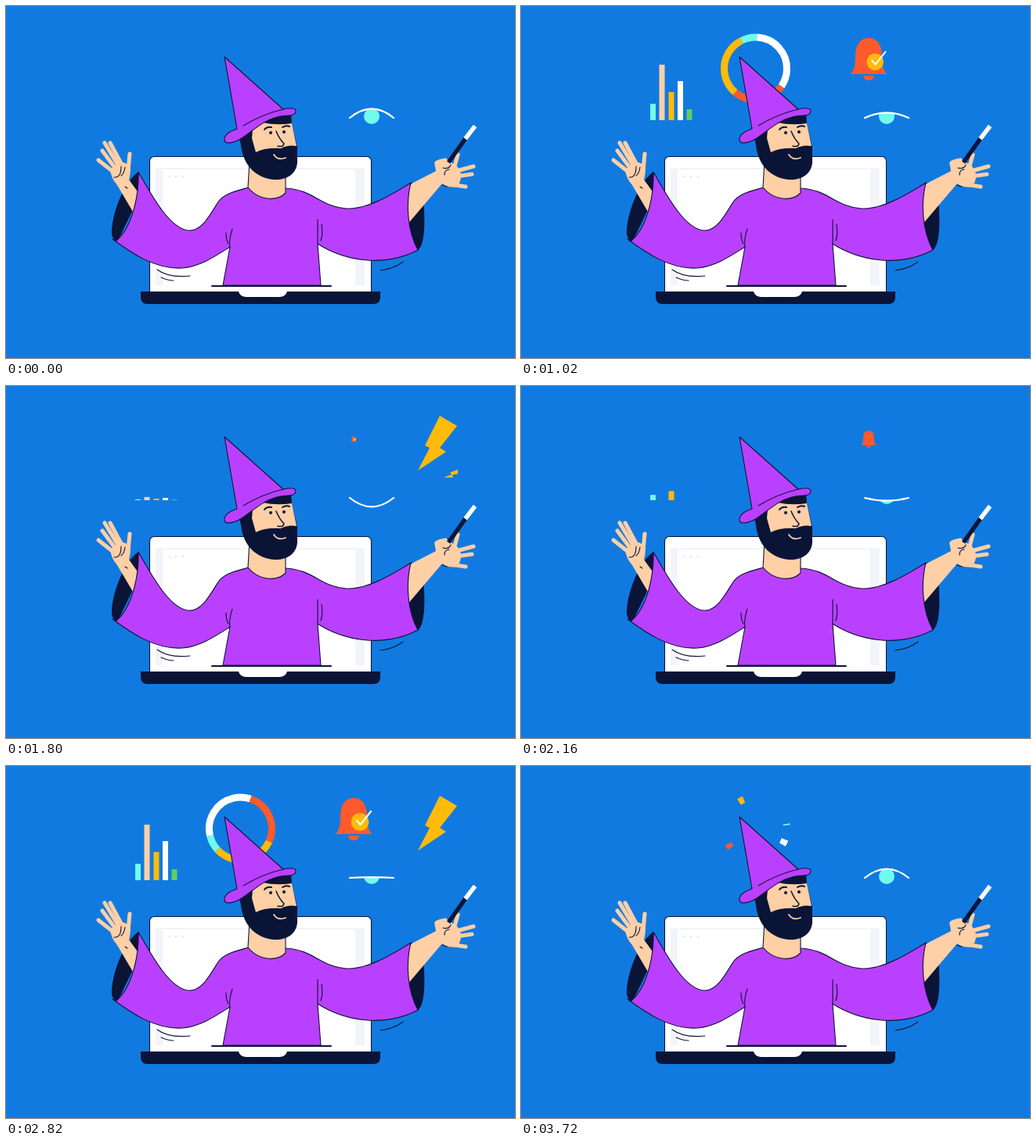
An HTML page that plays this animation: 650x450 px, repeating every 3780 ms.

```html
<!DOCTYPE html>
<html lang="en">
<head>
<meta charset="utf-8">
<title>Wizard</title>
<style>
  html, body { margin: 0; width: 100%; height: 100%; overflow: hidden; background: #117ae0; }
  svg { display: block; }
  .ink { fill: #0a1437; }
  .skin { fill: #ffcfa6; }
  .robe { fill: #ba40ff; }
  .line { fill: none; }
  .line, .edge { stroke: #0a1437; stroke-width: 1.1; stroke-linecap: round; stroke-linejoin: round; }
  .fingers { fill: none; stroke: #ffcfa6; stroke-width: 5; stroke-linecap: round; stroke-linejoin: round; }
  .thick { stroke-width: 2; }
</style>
</head>
<body>
<svg width="650" height="450" viewBox="0 0 650 450">
  <defs><clipPath id="underLid"><path id="lidClip"/></clipPath></defs>
  <g id="ring" fill="none" stroke-width="9"></g>
  <g id="bars"></g>

  <g id="bell">
    <path fill="#ff5a2b" d="M420 87Q427 83 427 65C427 48 434 41 444 41S461 48 461 65Q461 83 468 87ZM437 89H451Q450 95 444 95T437 89Z"/>
    <g id="badge">
      <circle cx="452" cy="71.5" r="11.3" fill="#ffbb08"/>
      <path d="M448 70L452.5 75L466 58" fill="none" stroke="#fff" stroke-width="2.2" stroke-linecap="round"/>
    </g>
  </g>

  <g fill="#ffbb08">
    <path id="bolt" d="M554 38L576 51L554 79L562 84L526 108L541 79L535 76Z"/>
    <path id="spark" d="M582 104L569 109L572 112L559 117H574L573 113L582 111Z"/>
  </g>

  <circle cx="467" cy="141" r="10" fill="#70fbec" clip-path="url(#underLid)"/>
  <path id="lid" fill="none" stroke="#fff" stroke-width="2.2" stroke-linecap="round"/>

  <!-- laptop -->
  <path class="edge" fill="#fff" d="M183.5 367V199Q183.5 192.5 190 192.5H460Q466.5 192.5 466.5 199V367Z"/>
  <path fill="#f2f4f9" d="M191 207H458V357H446V209H200V357H191Z"/>
  <g fill="#e6e9f1"><circle cx="209" cy="218" r="1.5"/><circle cx="217" cy="218" r="1.5"/><circle cx="226" cy="218" r="1.5"/></g>
  <path class="ink" d="M172 365H478V372Q478 381 469 381H181Q172 381 172 372Z"/>
  <path fill="#fff" d="M297 365H359Q357 372 349 372H307Q299 372 297 365Z"/>

  <!-- sleeve openings and arms -->
  <path class="ink" d="M169 212C149 226 134 270 135 291Q136 300 143 300L172 240Z"/>
  <path class="ink" d="M516 226Q532 222 534 262Q536 306 525 313L510 280Z"/>
  <path class="skin" d="M133 209L146 199Q157 201 159 207Q159 215 157 222L170 240L165 268L142 229Q134 220 133 209Z"/>
  <path class="fingers" d="M118 197L137 212M123 185L140 208M126 175L144 205M133 175L149 205M158 189L156 210"/>
  <path class="line" d="M138 219Q147 220 147 205M152 206Q151 214 147 217M152 231L155 233"/>
  <path class="skin" d="M512 230L549 211L547 200Q553 194 562 196L576 205Q586 217 576 231Q566 233 557 227L512 280Z"/>
  <path class="fingers" d="M572 208L577 190M575 211L597 205M574 218L595 215M562 227L587 231"/>
  <path d="M565 200L587 169" stroke="#0a1437" stroke-width="5.5"/>
  <path d="M586.5 169.700L599 153.5" stroke="#fff" stroke-width="5.5"/>
  <path class="fingers" d="M551 200L561 197M555 207L568 207"/>
  <path class="line" d="M558 207Q566 209 568 203M560 216Q560 209 566 209M557 229L563 231"/>

  <!-- robe -->
  <path class="robe edge" d="M310 232C292 237 277 240 270 252C259 270 250 286 235 287C211 287 188 246 169 212C170 245 160 284 141 300L136 298C159 315 190 337 225 335C249 333 270 318 286 308L277 357H402L398 304C429 324 480 336 526 312C513 288 510 254 517 226C488 244 460 260 435 259C399 256 394 235 357 233Z"/>
  <path class="line" d="M289 285C286 294 285 302 286 308M281 290Q281 299 284 304M398 273V304M403 279Q405 292 402 300"/>
  <path class="line" d="M193 337Q208 348 235 345M198 347Q207 351 214 351M478 338Q495 336 507 327"/>
  <path class="line thick" d="M263 358H415"/>

  <!-- head -->
  <path class="skin edge" d="M311 198L309 232C322 248 345 251 357 239V205Z"/>
  <path class="ink" d="M298 168L330 143L364 137L365 150L372 180V200C371 214 360 222 344 222C322 221 303 206 300 178Z"/>
  <path class="skin" d="M315 158L328 149Q345 153 365 150L371 179Q360 177 351 182Q330 181 319 187L314 169Z"/>
  <path class="line thick" d="M330 158Q333 154 339 155M353 155Q358 152 362 154"/>
  <path class="line" style="stroke-width:1.5" d="M345 160Q349 170 355 176Q354 181 347 179"/>
  <circle class="ink" cx="338" cy="162" r="2"/><circle class="ink" cx="355" cy="161" r="2"/>
  <path d="M342 190Q347 198 357 194" fill="none" stroke="#ffcfa6" stroke-width="1.8" stroke-linecap="round"/>
  <path class="robe edge" d="M279 65L354 132C362 130 370 130 370 134C370 142 358 139 346 142C330 146 318 157 304 167C295 174 281 178 279 172C278 165 286 160 295 157Z"/>
  <path class="line" d="M303 153Q328 138 354 132"/>
</svg>

<script>
const LOOP = 3780, BEAT = 1260;
const $ = id => document.getElementById(id);
const clamp = x => Math.min(1, Math.max(0, x));
const span = (t, start, length) => clamp((t - start) / length);
const quad = u => u < .5 ? 2 * u * u : 1 - 2 * (1 - u) ** 2;
const cubic = u => u < .5 ? 4 * u ** 3 : 1 - 4 * (1 - u) ** 3;

function add(parent, tag, attrs) {
  const node = document.createElementNS('http://www.w3.org/2000/svg', tag);
  for (const key in attrs) node.setAttribute(key, attrs[key]);
  return $(parent).appendChild(node);
}

function scale(id, x, y, s) {
  $(id).setAttribute('transform', `translate(${x} ${y}) scale(${s}) translate(${-x} ${-y})`);
}

// colour, first degree, sweep
const arcs = [['#fff', 0, 122], ['#ff5a2b', 122, 96], ['#ffbb08', 218, 113], ['#70fbec', 331, 29]]
  .map(([stroke, from, sweep]) => ({
    from, sweep, node: add('ring', 'circle', { cx: 299.5, cy: 80, r: 40, stroke, pathLength: 360 })
  }));

// colour, left, height, delay
const bars = [['#70fbec', 165, 21, 0], ['#ffcfa6', 176.5, 71, 145], ['#ffbb08', 188.5, 36, 0],
  ['#fff', 200, 50, 145], ['#62cb62', 211.5, 14, 145]]
  .map(([fill, x, height, delay]) => ({ height, delay, node: add('bars', 'rect', { x, fill, width: 7 }) }));

function drawRing(t) {
  const time = t < 1890 ? t : t - 2246;
  const shown = quad(span(time, 114, 300)) * (1 - span(time, 1089, 410) ** 1.5);
  for (const { node, from, sweep } of arcs) {
    node.setAttribute('stroke-dasharray', `${sweep * shown} 400`);
    node.setAttribute('transform', `rotate(${30 + time * .2375 + from} 299.5 80)`);
  }
}

function drawBars(t) {
  const time = t < 1980 ? t : t - 1500;
  const left = 1 - quad(span(time, 1390, 495));
  for (const { node, height, delay } of bars) {
    const h = height * left * quad(span(time, 518 + delay, 355));
    node.setAttribute('y', 146 - h);
    node.setAttribute('height', h);
  }
}

function drawBell(t) {
  const time = t < 2000 ? t : t - 1575;
  scale('bell', 444, 68, quad(span(time, 479, 238)) * (1 - quad(span(time, 1640, 220))));
  scale('badge', 455, 69, quad(span(time, 870, 180)));
}

function drawBolts(beat) {
  scale('bolt', 526, 108, quad(span(beat, 145, 140)) * (1 - quad(span(beat, 700, 170))));
  scale('spark', 559, 117, quad(span(beat, 420, 180)) * (1 - quad(span(beat, 600, 200))));
}

function drawEye(beat) {
  const shut = cubic(beat < 620 ? beat / 620 : (BEAT - beat) / (BEAT - 620));
  const lid = `M439 143Q467 ${120 + 46 * shut} 495 143`;
  $('lid').setAttribute('d', lid);
  $('lidClip').setAttribute('d', lid + 'V170H439Z');
}

function draw() {
  const t = performance.now() % LOOP, beat = t % BEAT;
  drawRing(t);
  drawBars(t);
  drawBell(t);
  drawBolts(beat);
  drawEye(beat);
  requestAnimationFrame(draw);
}
draw();
</script>
</body>
</html>
```
